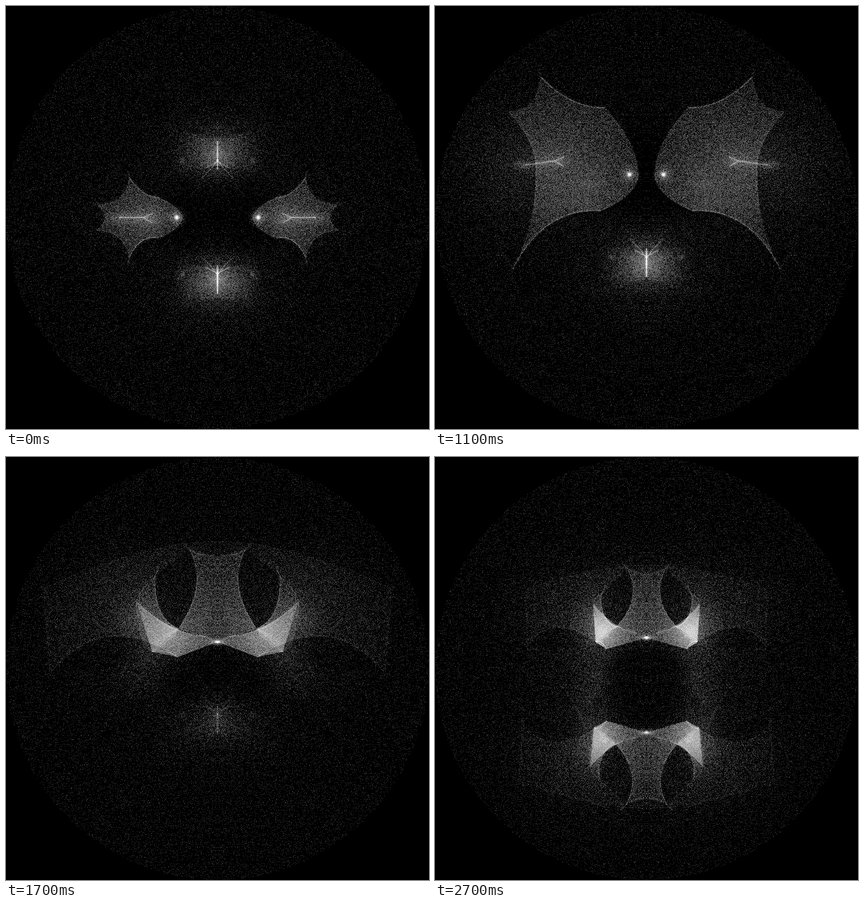
Write an HTML page with a canvas that moves like this. It is 748 px wide and 748 px high and loops after 2.8 s.

```html
<!DOCTYPE html>
<html lang="en">
<head>
<meta charset="utf-8">
<title>Mirrored point cloud</title>
<style>
html, body { margin: 0; width: 100%; height: 100%; overflow: hidden; background: #000; }
canvas { display: block; }
</style>
</head>
<body>
<canvas id="stage" width="748" height="748"></canvas>
<script>
const SIZE = 748, HALF = 374, STEP = 100, FRAMES = 28, DOT = 48;
const out = document.getElementById('stage').getContext('2d');
const image = out.createImageData(SIZE, SIZE);
const pixels = new Uint32Array(image.data.buffer);

// The left half is painted as a smooth gray field, then turned into points.
const field = document.createElement('canvas');
field.width = HALF;
field.height = SIZE;
const ctx = field.getContext('2d', { willReadFrequently: true });

const mix = (a, b, u) => a + (b - a) * u;
const between = (p, q, u) => p.map((a, i) => mix(a, q[i], u));
const ramp = (t, from, to) => Math.min(1, Math.max(0, (t - from) / (to - from)));
const flip = ([x, y]) => [x, SIZE - y];
const light = v => `rgba(255,255,255,${v / 255})`;

function line(path, v, width = 1.3) {
  const p = new Path2D(path);
  for (const [extra, part] of [[0, 1], [5, .12]]) {
    ctx.strokeStyle = light(v * part);
    ctx.lineWidth = width + extra;
    ctx.stroke(p);
  }
}
function soften(gradient, inner, outer) {
  for (let r = 0; r <= 1; r += .125) gradient.addColorStop(r, light(mix(outer, inner, (1 - r) ** 2)));
  return gradient;
}
function fill(path, [x, y], r, inner, outer) {
  ctx.fillStyle = soften(ctx.createRadialGradient(x, y, 0, x, y, r), inner, outer);
  ctx.fill(new Path2D(path));
}
function glow(x, y, rx, ry, v) {
  ctx.save();
  ctx.translate(x, y);
  ctx.scale(rx, ry);
  fill('M-1,-1H1V1H-1Z', [0, 0], 1, v, 0);
  ctx.restore();
}
function shade(path, alpha) {
  ctx.globalCompositeOperation = 'source-over';
  ctx.fillStyle = `rgba(0,0,0,${alpha})`;
  ctx.fill(new Path2D(path));
  ctx.globalCompositeOperation = 'lighter';
}
function darken(y, rx, ry, alpha) {
  ctx.save();
  ctx.translate(HALF, y);
  ctx.scale(rx, ry);
  const g = ctx.createRadialGradient(0, 0, .6, 0, 0, 1);
  g.addColorStop(0, `rgba(0,0,0,${alpha})`);
  g.addColorStop(1, 'rgba(0,0,0,0)');
  ctx.globalCompositeOperation = 'source-over';
  ctx.fillStyle = g;
  ctx.fillRect(-1, -1, 2, 2);
  ctx.restore();
  ctx.globalCompositeOperation = 'lighter';
}

// Each shape moves between two poses. Fish: stage coordinates, the first pose is symmetric.
const small = { tip: [312, 374], up: [270, 338], cusp: [218, 303], leftUp: [160, 351], bend: [208, 397],
  streak: [200, 374], fork: [243, 374] };
small.leftLow = flip(small.leftUp);
small.low = flip(small.cusp);
small.corner = flip(small.up);
const large = { tip: [360, 298], up: [300, 180], cusp: [187, 125], leftUp: [130, 187], bend: [180, 385],
  streak: [160, 281], fork: [212, 274], leftLow: [178, 300], low: [138, 465], corner: [293, 362] };

// Mask: offsets from its apex on the axis.
const wide = { corner: [-70, 34], barb: [-139, 27], pillar: [-64, -201], waist: [-49, -123], cross: [-84, -26],
  horn: [-139, -153], wing: [-189, -83], tail: [-244, 132], shoulder: [-394, -103], crest: [0, -223],
  start: [-374, 92], peak: [-234, -63] };
const tight = { corner: [-71, 20], barb: [-89, 8], pillar: [-34, -121], waist: [-24, -69], cross: [-52, -19],
  horn: [-79, -72], wing: [-92, -57], tail: [-149, 86], shoulder: [-212, -84], crest: [0, -126],
  start: [-207, 16], peak: [-169, -54] };

function pose(from, to, u) {
  return Object.fromEntries(Object.keys(from).map(k => [k, between(from[k], to[k], u)]));
}
const growth = t => Math.min((t / 1100) ** 2, 1.25);
const closing = age => Math.max(-.3, 1 - Math.exp(-age / 315));

function fishAt(u) {
  const p = pose(small, large, u);
  const lift = 18 * Math.sin(Math.PI * Math.min(u, 1));
  for (const k in p) if (small[k][1] >= HALF) p[k][1] -= lift;
  return p;
}

function drawFish(u) {
  const { tip, up, cusp, leftUp, leftLow, bend, low, corner, streak, fork } = fishAt(u);
  const back = `${mix(up[0], cusp[0], .55)},${up[1]} ${cusp}`;
  const belly = `${mix(corner[0], low[0], .66)},${corner[1] - 5} ${low}`;
  const body = `M${low}Q${mix(corner[0], low[0], .66)},${corner[1] - 5} ${corner}` +
    `Q${tip[0] - 4},${mix(tip[1], corner[1], .6)} ${tip}Q${tip[0] - 4},${mix(tip[1], up[1], .5)} ${up}` +
    `Q${back}Q${cusp[0] - 6},${leftUp[1]} ${leftUp}` +
    `Q${mix(leftUp[0], leftLow[0], .5) + 30},${mix(leftUp[1], leftLow[1], .5)} ${leftLow}Q${bend} ${low}Z`;
  const heart = between(up, corner, mix(.5, .75, Math.min(u, 1)));
  heart[0] -= mix(8, 22, u);

  glow(...streak, mix(150, 210, u), mix(120, 200, u), mix(10, 34, u));
  fill(body, heart, tip[0] - leftUp[0], 72, 24);
  line(body, 24);
  line(`M${up}Q${back}M${corner}Q${belly}`, 42);
  line(`M${cusp}l-3,-14M${low}l-2,16M${low}l-16,-24l-14,0`, 22);
  line(`M${streak}L${fork}l16,-7M${fork}l16,10`, 55, 1.8);
  glow(...fork, 60, 26, 40);
  glow(...streak, 45, 18, 45);
  for (const [point, side] of [[cusp, -1], [low, 1]]) {
    line(`M${point[0] - 3},${point[1] + side * 34}` +
      `Q110,${point[1] - side * 10} 0,${point[1] - side * (33 - 100 * u * (side < 0))}`, 12 * Math.max(0, 1 - u));
  }
  const eye = tip[0] - mix(10, 16, u);
  glow(eye, tip[1], 24, 24, 90);
  glow(eye, tip[1], 7, 7, 220);
}

function drawButterfly(y, side, alpha) {
  if (alpha <= 0) return;
  ctx.save();
  ctx.globalAlpha = alpha;
  ctx.translate(HALF, y);
  ctx.scale(1, side);
  glow(0, 30, 190, 150, 22);
  glow(0, 20, 95, 75, 75);
  fill('M0,0L-85,-14Q-60,30 -110,85Q-40,55 0,50Z', [0, 20], 125, 32, 0);
  line('M0,12Q-8,-4 -29,-22M0,8L-22,-4', 55, 1.6);
  line('M0,-6V44', 100, 2.6);
  line('M0,-6L-45,-48', 14);
  glow(-62, 9, 10, 10, 60);
  line('M-49,54L-52,42L-60,37M-52,42L-46,36', 26);
  ctx.restore();
}

function drawMask(y, side, u, alpha) {
  if (alpha <= 0) return;
  const { corner, barb, pillar, waist, cross, horn, wing, tail, shoulder, crest, start, peak } = pose(wide, tight, u);
  const gain = mix(.85, 1.1, u);
  const inside = waist.map((w, i) => 2 * w - (pillar[i] + cross[i]) / 2);
  const column = `M${pillar}Q${inside} ${cross}`;
  const crescent = `Q${horn[0] - 2},${mix(horn[1], cross[1], .8)} `;
  const band = `${wing[0] * .6},-14 -20,-9`;
  const under = `M${corner}Q${(corner[0] + barb[0]) / 2},${Math.min(corner[1], barb[1]) - 6} ${barb}`;
  const ridge = `M${shoulder}Q${shoulder[0] * .4},${crest[1]} ${crest}`;
  const arc = `M${start}Q${peak} ${corner}`;

  ctx.save();
  ctx.globalAlpha = alpha;
  ctx.translate(HALF, y);
  ctx.scale(1, side);
  glow(wing[0], -35, 250, 210, 20);
  fill(`${ridge}L0,0L${corner}Q${peak} ${start}Z`, cross, -shoulder[0], 30, 5);
  shade(`${arc}Z`, .3);
  shade(`${column}${crescent}${horn}Z`, .5);
  fill(`${column}L0,0V${pillar[1] + 12}Z`, cross, -pillar[1], 45 * gain, 20);
  fill(`M${horn}${crescent}${cross}L${barb}Q${wing[0]},${barb[1] / 2} ${wing}Z`, cross, -wing[0], 50 * gain, 10);
  fill(`M${wing}Q${band}L0,0L${corner}L${barb}Z`, [corner[0] - 8, -8], 30 - wing[0], 100 * gain, 12);
  glow(wing[0], wing[1] + 25, 55, 65, 30 * gain);
  glow(...barb, 70, 60, 38 * gain);
  glow(wing[0] + 5, 65, 60, 55, 30 * Math.max(0, u));

  line(column, 45);
  line(`M${pillar}l-10,-10M${pillar}q18,12 40,12`, 32);
  line(`M${cross}Q${mix(cross[0], barb[0], .4)},${mix(cross[1], barb[1], .6)} ${barb}`, 32);
  line(`M${horn}${crescent}${cross}`, 48);
  line(`M${horn}l8,-18M${horn}Q${wing[0] + 4},${wing[1] - 18} ${wing}`, 34);
  line(`M${wing}Q${band}`, 38);
  line(under, 50);
  line(`M${corner}L0,0`, 24);
  line(`M${wing}Q${wing[0]},${mix(wing[1], tail[1], .6)} ${tail}`, 18);
  line(`${ridge}M${shoulder}Q${shoulder[0] + 6},${(shoulder[1] + start[1]) / 2} ${start}`, 14);
  line(`M${shoulder}l-12,-6`, 12);
  line(arc, 20);
  glow(0, 1, 30, 11, 110);
  glow(0, 1, 8, 6, 170);
  ctx.restore();
}

function paintField(t) {
  ctx.globalCompositeOperation = 'source-over';
  ctx.globalAlpha = 1;
  ctx.fillStyle = '#000';
  ctx.fillRect(0, 0, HALF, SIZE);
  ctx.save();
  ctx.beginPath();
  ctx.arc(HALF, HALF, HALF, 0, 7);
  ctx.clip();
  ctx.fillStyle = light(7);
  ctx.fill();
  ctx.globalCompositeOperation = 'lighter';
  glow(HALF, HALF, HALF, HALF, 9);

  const u = growth(t), swap = ramp(t, 1150, 1400);
  const apex = 328 - 9 * ((t - 2000) / 700) ** 2;
  const base = 440 + 143 * Math.exp((2300 - t) / 365);
  if (swap < .5) {
    darken(fishAt(u).tip[1], mix(150, 205, u), 105, .75);
  } else {
    const floor = Math.min(base, mix(440, 590, ramp(t, 1500, 2100)));
    darken((apex + floor) / 2, 115, (floor - apex) / 2, .75);
  }

  drawButterfly(435 + 30 * ((t - 1100) / 1100) ** 2, 1, 1 - ramp(t, 1500, 1850));
  drawButterfly(283 - 71 * (t / 700) ** 2, -1, .85 * (1 - ramp(t, 0, 1050)));
  ctx.globalAlpha = 1 - swap;
  if (swap < 1) drawFish(u);
  ctx.globalAlpha = 1;
  drawMask(apex, 1, closing(t - 1500), swap);
  drawMask(base, -1, closing(t - 1900), .9 * ramp(t, 1700, 2100));
  ctx.restore();
}

// Each pixel gets a Poisson number of hits, shown on a log scale.
const miss = Array.from({ length: 256 }, (_, v) => Math.exp(1 - 2 ** (v / DOT)));

function scatter(seed) {
  const random = () => (seed = Math.imul(seed, 1664525) + 1013904223 >>> 0) / 4294967296;
  const density = ctx.getImageData(0, 0, HALF, SIZE).data;
  for (let y = 0, i = 0; y < SIZE; y++) {
    for (let x = 0; x < HALF; x++, i += 4) {
      let hits = 0;
      if (density[i]) {
        for (let p = random(); p > miss[density[i]]; p *= random()) hits++;
      }
      const gray = Math.min(255, Math.round(DOT * Math.log2(1 + hits)));
      const row = y * SIZE;
      pixels[row + x] = pixels[row + SIZE - 1 - x] = 0xff000000 | gray * 0x10101;
    }
  }
  out.putImageData(image, 0, 0);
}

let shown = -1;
function tick() {
  const step = Math.floor(performance.now() / STEP) % FRAMES;
  if (step !== shown) {
    shown = step;
    paintField(step * STEP);
    scatter(step * 7919 + 1);
  }
  requestAnimationFrame(tick);
}
tick();
</script>
</body>
</html>
```
